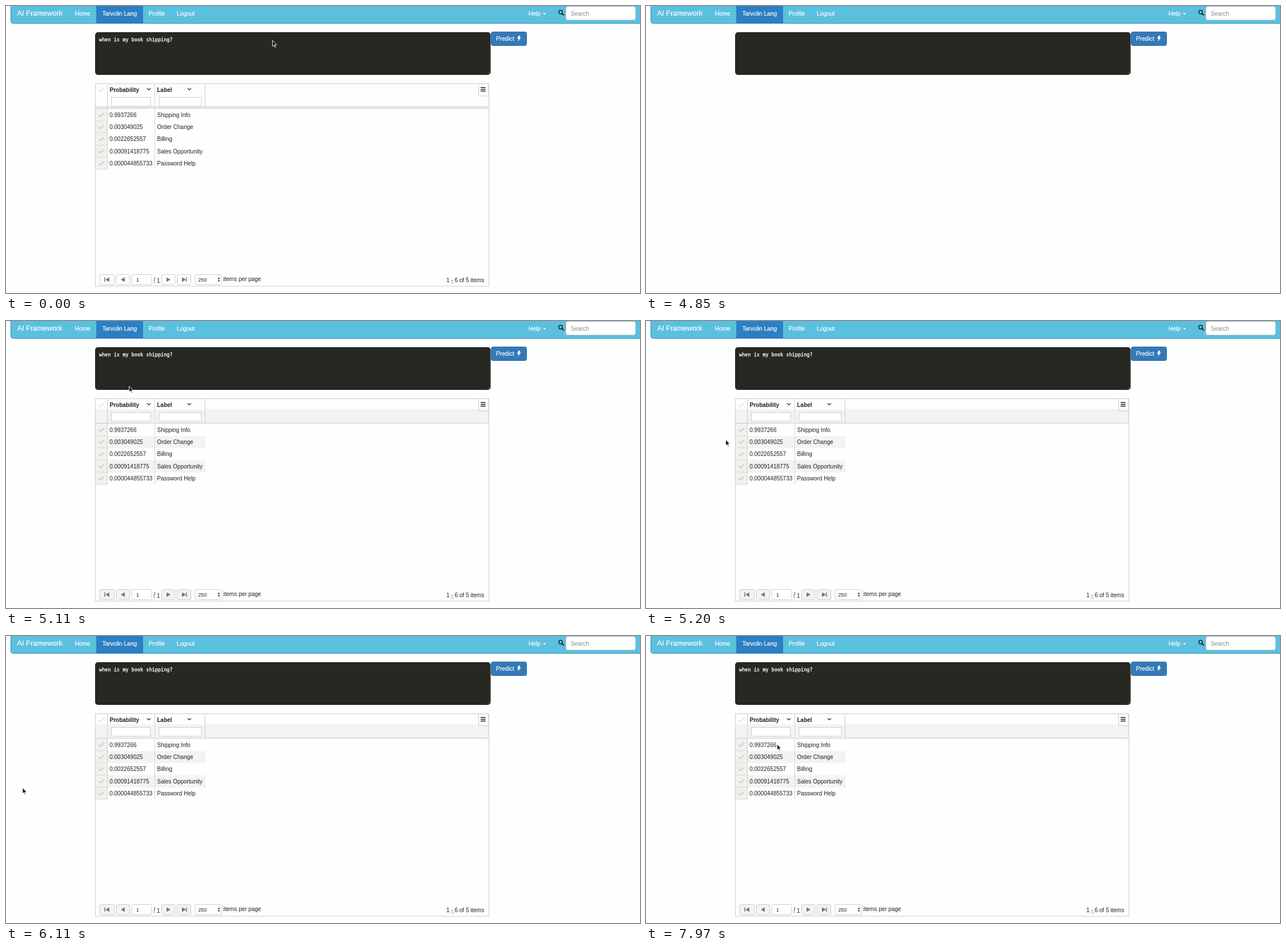
An HTML page for the animation above (8 s loop, 1110 by 504 pixels).

```html
<!DOCTYPE html>
<html lang="en">
<head>
<meta charset="utf-8">
<title>Prediction grid</title>
<style>
html, body { margin: 0; width: 100%; height: 100%; overflow: hidden; background: #fefefe; }
svg { display: block; font: 10px "Liberation Sans", Arial, sans-serif; fill: #222; }
.nav { font-size: 10.2px; fill: #fff; stroke: #fff; stroke-width: .2; }
.bold { font-weight: bold; }
.mono { font: 8.55px "DejaVu Sans Mono", monospace; fill: #fff; stroke: #fff; stroke-width: .3; }
.box { fill: #fff; stroke: #ccc; }
.line { fill: none; stroke: #ccc; }
.ink { fill: none; stroke: #222; stroke-width: 1.2; }
.dots { stroke: #555; stroke-dasharray: 1 1; }
.button { stroke: #ccc; }
.icon { fill: #777; }
</style>
</head>
<body>
<svg width="1110" height="504" viewBox="0 0 1110 504">
  <defs>
    <path id="tick" d="M0 4 L3 7 L9 1" fill="none" stroke-width="1.8"/>
    <path id="chevron" class="ink" d="M0 0 L3 3 L6 0"/>
  </defs>

  <path d="M1112 -2 V30.5 H12.5 Q8.5 30.5 8.5 26.5 V-2 Z" fill="#5bc0de" stroke="#3488bd"/>
  <rect x="158" width="82" height="31" fill="#2b7fc3"/>
  <g class="nav">
    <text x="19.5" y="17" style="font-size:12.75px">AI Framework</text>
    <text x="120.5" y="16.5">Home</text>
    <text x="168.5" y="16.5">Tarvolin Lang</text>
    <text x="249.5" y="16.5">Profile</text>
    <text x="299" y="16.5">Logout</text>
    <text x="915" y="16.5">Help</text>
    <path d="M940 12.5 h5.5 l-2.75 2.7 z" stroke="none"/>
  </g>
  <path d="M973.5 13.5 L977 16.5" stroke="#222" stroke-width="2"/>
  <circle cx="971" cy="10.8" r="3.2" fill="none" stroke="#222" stroke-width="1.5"/>
  <rect class="box" x="980.5" y="1" width="121.5" height="23.5" rx="3"/>
  <text x="989" y="16.7" fill="#888">Search</text>

  <rect x="156" y="46" width="692.5" height="75" rx="5" fill="#272822"/>
  <path d="M842 120 l5 -5 M845 120 l2 -2" stroke="#777" stroke-width=".7"/>
  <rect x="849.5" y="45.5" width="62" height="24" rx="3" fill="#337ab7" stroke="#2e6da4"/>
  <text class="nav" x="858" y="61.3">Predict</text>
  <path d="M897.5 52 h3 l-1.5 3.5 h2.7 l-5.7 7 1.7 -5 h-3 z" fill="#fff"/>
  <text id="query" class="mono" x="163" y="62.3">when is my book shipping?</text>

  <g id="grid">
    <rect class="box" x="156.5" y="136.5" width="689" height="355.5" style="fill:#fefefe"/>
    <g id="polished">
      <rect x="157" y="155" width="688" height="24" fill="#f3f3f3"/>
      <path d="M178 202 h171 v21.3 h-171 z M178 244.6 h171 v21.3 h-171 z" fill="#f3f3f3"/>
    </g>
    <path id="band" d="M157 177.5 H845" stroke="#e9e9e9" stroke-width="4"/>
    <path id="rule" class="line" d="M157 179.5 H845"/>
    <rect id="menu" class="line" x="827.5" y="136.5" width="17.5" height="21.5"/>
    <path d="M831 143.3 h8.5 M831 146.4 h8.5 M831 149.5 h8.5" stroke="#222" stroke-width="1.5"/>
    <use href="#tick" x="162.5" y="143.5" stroke="#e3e3e3"/>

    <g id="empty">
      <path class="line" d="M157 157.5 H177.5 V137"/>
      <text class="bold" x="181.5" y="151">Id</text>
      <rect class="box" x="185" y="160.5" width="653.5" height="15.5"/>
    </g>

    <g id="filled">
      <rect x="157" y="180" width="20.5" height="107" fill="#f0f0ec"/>
      <path class="line" d="M177.5 137 V287 M348.5 137 V179"/>
      <path class="line" d="M260.5 137 V287" style="stroke:#d8d8d8"/>
      <text class="bold" x="181.5" y="151">Probability</text>
      <text class="bold" x="264.5" y="151">Label</text>
      <use href="#chevron" x="247" y="144.5"/>
      <use href="#chevron" x="318" y="144.5"/>
      <rect class="box" x="184.5" y="160.5" width="68.5" height="15.5"/>
      <rect class="box" x="268" y="160.5" width="74" height="15.5"/>
      <g id="rows"></g>
      <text x="771" y="485">1 - 6 of 5 items</text>
      <path class="dots" d="M779 486.5 h5"/>
    </g>

    <g id="buttons" class="button">
      <rect x="164" y="471.5" width="25.5" height="18" rx="2.5"/>
      <rect x="193" y="471.5" width="23.5" height="18" rx="2.5"/>
      <rect x="272.5" y="471.5" width="23.5" height="18" rx="2.5"/>
      <rect x="299.5" y="471.5" width="24" height="18" rx="2.5"/>
    </g>
    <path class="icon" d="M172 476.5 h1.5 v8 h-1.5 z M181 476.5 v8 l-7 -4 z M208 476.5 v8 l-7 -4 z
      M281 476.5 v8 l7 -4 z M308 476.5 v8 l7 -4 z M315 476.5 h1.5 v8 h-1.5 z"/>
    <rect class="box" x="220" y="471.5" width="35" height="18" rx="2.5"/>
    <text x="228" y="483.7" font-size="9">1</text>
    <text x="258.5" y="484">/</text>
    <path class="dots" d="M258 486 h4"/>
    <text x="264" y="486">1</text>
    <rect class="box" x="331" y="471.5" width="47" height="18" rx="2.5"/>
    <text x="336.5" y="483.7" font-size="9">250</text>
    <path d="M370.5 479.5 h4.5 l-2.25 -3 z M370.5 481.5 h4.5 l-2.25 3 z" fill="#444"/>
    <text x="380.5" y="483">items per page</text>
  </g>

  <path id="arrow" d="M.5 .5 V10.8 L2.9 8.6 L4.6 12.5 L6.2 11.8 L4.5 8 H7.8 Z" fill="#111" stroke="#fff" stroke-width=".9"/>
  <path id="hand" d="M286.2 7 q1.4 -1 1.9 .7 l.7 3 q1 -.8 1.7 .2 q1 -.7 1.6 .4 q1.2 -.3 1.3 1 l-.3 2.5 l-1 3 h-4.6 l-2.6 -3.4 q-.8 -1.7 1 -1.1 l1.2 .9 z" fill="#fff" stroke="#111" stroke-width=".9"/>
</svg>
<script>
const $ = id => document.getElementById(id);
const show = (id, on) => { $(id).style.display = on ? "" : "none"; };
const mix = (a, b, u) => a.map((v, i) => v + (b[i] - v) * u);

const REST = [28.5, 266], SIDE = [139, 208];
const data = [
  ["0.9937266", "Shipping Info"],
  ["0.003049025", "Order Change"],
  ["0.0022652557", "Billing"],
  ["0.00091418775", "Sales Opportunity"],
  ["0.000044855733", "Password Help"],
];
$("rows").innerHTML = data.map(([value, label], i) => {
  const y = 21.3 * i;
  return `<use href="#tick" x="162.5" y="${187 + y}" stroke="#ccccc8"/>
    <path d="M157 ${Math.round(201 + y) + .5} h20" stroke="#d8d8d5"/>
    <text x="181.2" y="${194.7 + y}">${value}</text>
    <text x="264.5" y="${194.7 + y}">${label}</text>`;
}).join("");

// Pointer position at time t, or null while it is hidden.
function pointer(t) {
  if (t < 1640) return [466, 60];
  if (t < 5110) return null;
  if (t < 5200) return [215, 114];
  if (t < 5260) return SIDE;
  if (t < 5750) {
    const u = (Math.floor((t - 5260) / 61.25) + 1) / 8;
    return mix(SIDE, REST, 1 - (1 - u) ** 2.5);
  }
  if (t < 6110) return null;
  if (t < 7510) return REST;
  const u = Math.min(1, (Math.floor((t - 7510) / 65.7) + 1) / 8);
  return mix(REST, [229, 189.5], u * u * (3 - 2 * u));
}

function draw() {
  const t = performance.now() % 8000;
  const blank = t >= 4850 && t < 5020;
  const empty = t >= 5020 && t < 5110;
  const plain = t < 660 || empty;
  show("query", !blank);
  show("grid", !blank);
  show("empty", empty);
  show("filled", !empty);
  show("polished", !plain);
  show("band", plain);
  const left = empty ? 178 : 157;
  $("band").setAttribute("d", `M${left} 177.5 H845`);
  $("rule").setAttribute("d", `M${left} 179.5 H845`);
  $("menu").style.fill = plain ? "none" : "#f3f3f340";
  $("buttons").style.fill = plain ? "#fefefe" : "#f3f3f3";
  show("hand", empty);
  const at = pointer(t);
  show("arrow", at);
  if (at) $("arrow").setAttribute("transform", `translate(${at})`);
  requestAnimationFrame(draw);
}
draw();
</script>
</body>
</html>
```
